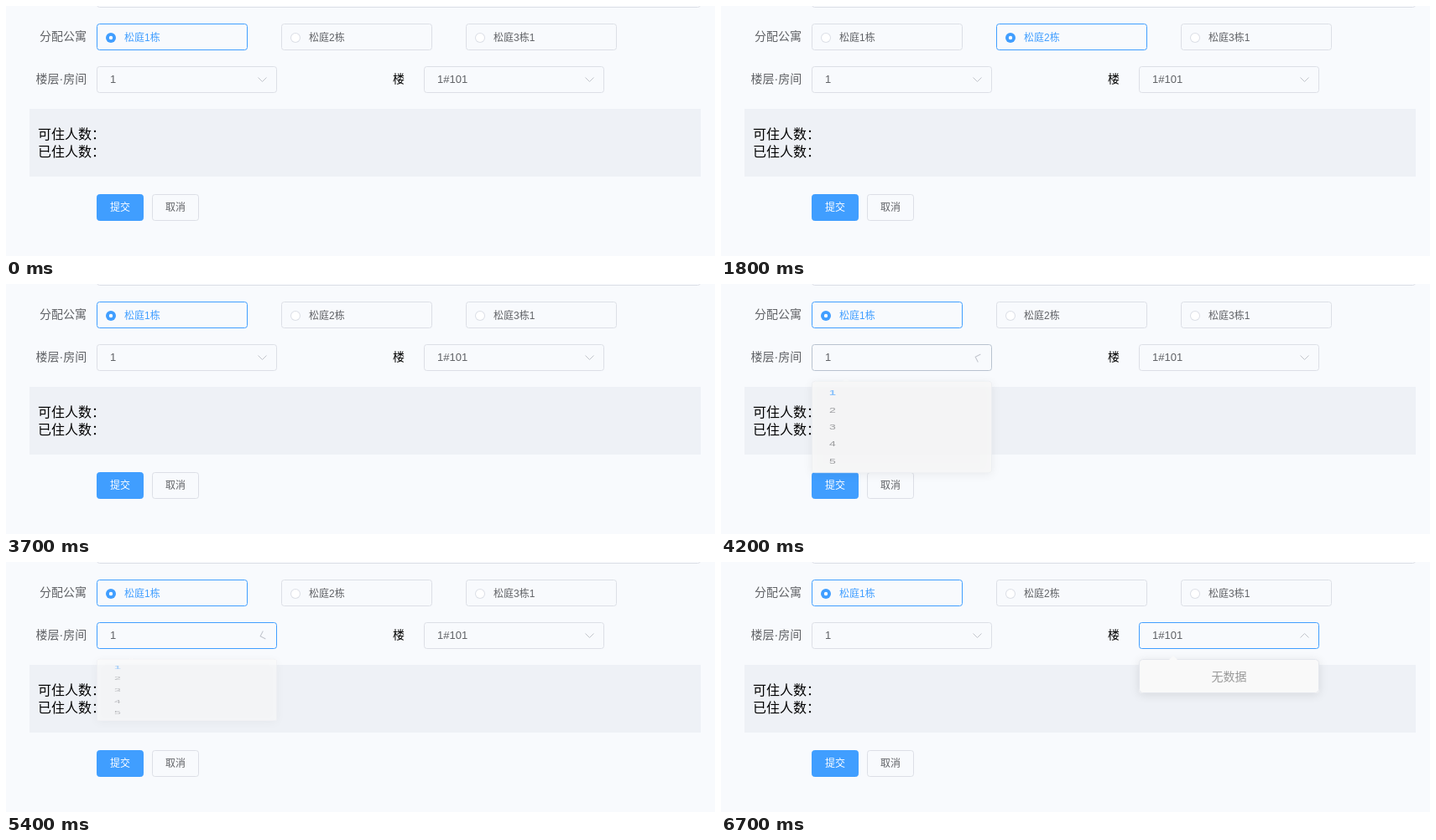
An HTML page with a canvas that plays this animation: 845 by 299 pixels, repeating every 8000 ms.

```html
<!DOCTYPE html>
<html lang="zh-CN">
<head>
<meta charset="utf-8">
<style>
html, body { margin: 0; height: 100%; overflow: hidden; background: #f8fafd; }
canvas { display: block; }
</style>
</head>
<body>
<canvas id="stage" width="845" height="299"></canvas>
<script>
const ctx = document.getElementById('stage').getContext('2d');
const FONT = '"Liberation Sans", "Noto Sans CJK SC", sans-serif';
const PAGE = '#f8fafd', BLUE = '#409eff', TEXT = '#606266', LINE = '#dcdfe6', HOVER = '#c0c4cc';
const BUILDINGS = ['松庭1栋', '松庭2栋', '松庭3栋1'];

const progress = (t, start, length) => Math.min(1, Math.max(0, (t - start) / length));
const easeOut = p => 1 - (1 - p) ** 5;
const easeInOut = p => p < 0.5 ? 4 * p ** 3 : 1 - 4 * (1 - p) ** 3;

function mix(from, to, p) {
  const channel = (hex, i) => parseInt(hex.slice(i, i + 2), 16);
  return `rgb(${[1, 3, 5].map(i => Math.round(channel(from, i) + (channel(to, i) - channel(from, i)) * p))})`;
}

// Each step fades from the colour before it.
function borderAt(t, steps) {
  let color = LINE, last = LINE;
  for (const [start, next, length] of steps) {
    if (t < start) break;
    color = mix(last, next, easeInOut(progress(t, start, length)));
    last = next;
  }
  return color;
}

function text(str, x, y, size, color, weight = '') {
  ctx.font = `${weight} ${size}px ${FONT}`;
  ctx.fillStyle = color;
  ctx.fillText(str, x, y);
}

function box(x, y, w, h, border, fill, radius = 3) {
  ctx.beginPath();
  ctx.roundRect(x + 0.5, y + 0.5, w - 1, h - 1, radius);
  ctx.fillStyle = fill;
  ctx.fill();
  ctx.strokeStyle = border;
  ctx.stroke();
}

function disc(x, y, r, color) {
  ctx.beginPath();
  ctx.arc(x, y, r, 0, 7);
  ctx.fillStyle = color;
  ctx.fill();
}

function radio(i, checked, dot) {
  const x = 108 + 220 * i;
  box(x, 21, 180, 32, checked ? BLUE : LINE, PAGE);
  disc(x + 17, 38, 6, checked ? BLUE : LINE);
  disc(x + 17, 38, checked ? 2.2 * dot : 5, '#fff');
  text(BUILDINGS[i], x + 33, 42, 12, checked ? BLUE : TEXT);
}

function select(x, value, border, open) {
  box(x, 72, 215, 32, border, PAGE);
  text(value, x + 16, 92, 13, TEXT);
  ctx.save();
  ctx.translate(x + 197.5, 88);
  ctx.rotate(Math.PI * open);
  ctx.beginPath();
  ctx.moveTo(-5, -2.5);
  ctx.lineTo(0, 2.5);
  ctx.lineTo(5, -2.5);
  ctx.strokeStyle = HOVER;
  ctx.stroke();
  ctx.restore();
}

function dropdown(x, height, open, drawItems) {
  if (open < 0.01) return;
  ctx.save();
  ctx.globalAlpha = open;
  ctx.translate(x, 116);
  ctx.scale(1, open);
  ctx.save();
  ctx.shadowColor = 'rgba(0,0,0,.1)';
  ctx.shadowBlur = 12;
  ctx.shadowOffsetY = 2;
  ctx.beginPath();
  ctx.roundRect(0, 0, 215, height, 4);
  ctx.fillStyle = '#f9f9f9';
  ctx.fill();
  ctx.restore();
  box(0, 0, 215, height, '#e4e7ed', '#f9f9f9', 4);
  ctx.beginPath();
  ctx.moveTo(36, 1);
  ctx.lineTo(41, -4);
  ctx.lineTo(46, 1);
  ctx.fillStyle = '#f9f9f9';
  ctx.fill();
  drawItems();
  ctx.restore();
}

function draw(t) {
  ctx.fillStyle = PAGE;
  ctx.fillRect(0, 0, 845, 299);
  box(108, -40, 720, 42, LINE, PAGE);

  text('分配公寓', 40, 41, 14, TEXT);
  const second = t >= 1600 && t < 3200;
  const dot = t < 1600 ? 1 : progress(t, second ? 1550 : 3150, 200);
  BUILDINGS.forEach((_, i) => radio(i, i === (second ? 1 : 0), dot));

  const floorOpen = t < 5350 ? easeOut(progress(t, 4150, 300)) : 1 - easeOut(progress(t, 5350, 300));
  const roomOpen = easeOut(progress(t, 6370, 300));
  text('楼层·房间', 35.5, 92, 14, TEXT);
  text('楼', 461, 92, 14, '#000');
  select(108, '1', borderAt(t, [
    [800, HOVER, 1], [1000, LINE, 1], [3700, HOVER, 1], [4150, BLUE, 200], [6370, LINE, 200]
  ]), floorOpen);
  select(498, '1#101', borderAt(t, [[6200, HOVER, 1], [6370, BLUE, 200]]), roomOpen);

  ctx.fillStyle = '#eef1f6';
  ctx.fillRect(28, 123, 800, 81);
  text('可住人数：', 38, 159, 16, '#000');
  text('已住人数：', 38, 180, 16, '#000');

  box(108, 225, 56, 32, BLUE, BLUE);
  text('提交', 124, 245, 12, '#fff');
  box(174, 225, 56, 32, LINE, PAGE);
  text('取消', 190, 245, 12, TEXT);

  dropdown(108, 184, floorOpen, () => {
    for (let i = 0; i < 5; i++) text(i + 1, 21, 29 + 34 * i, 14, i ? TEXT : BLUE, i ? '' : 'bold');
  });
  dropdown(498, 41, roomOpen, () => text('无数据', 86.5, 26, 14, '#999'));
}

const begin = performance.now();
function tick() {
  draw(Math.floor((performance.now() - begin) % 8000 / 100) * 100);
  requestAnimationFrame(tick);
}
tick();
</script>
</body>
</html>
```
